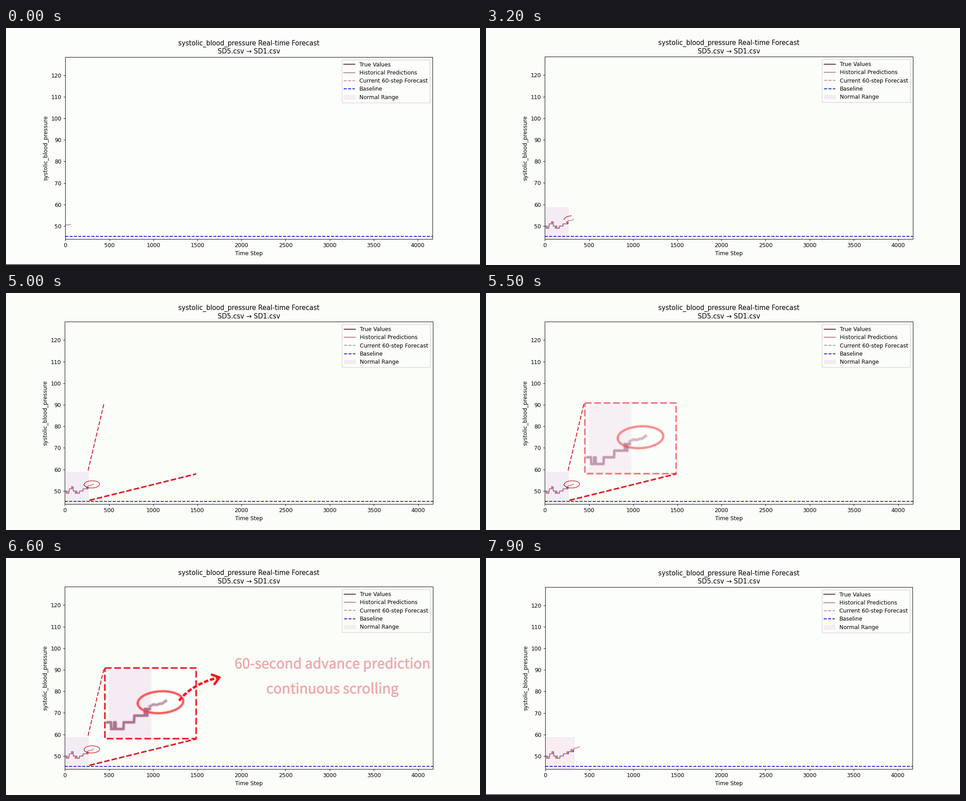
A matplotlib script for the animation above (8000 ms loop, 1057x530 px).

```python
import numpy as np
import matplotlib.pyplot as plt
from matplotlib.animation import FuncAnimation
from matplotlib.colors import to_rgb
from matplotlib.lines import Line2D
from matplotlib.patches import Rectangle
from matplotlib.patheffects import withStroke

W, H, DPI = 1057, 530, 64
PX = 72 / DPI          # points per pixel
S = 88 / DPI           # chart styling is sized for 88 dpi
FRAMES, INTERVAL = 80, 100
PAUSE, RESUME = 28, 73  # frames between which the chart stands still
RATE, HELD = 9.8, 264.6
X_MAX, BASE = 4170, 45.1
RED = "#ee1c22"
PAGE, PAGE_HELD = "#fcfefb", "#fbfdf9"

plt.rcParams.update({
    "font.family": "DejaVu Sans",
    "font.size": 10 * S,
    "lines.linewidth": 1.5 * S,
    "axes.linewidth": 0.8 * S,
    "patch.linewidth": 1.0 * S,
})


def step_series(knots, xs):
    starts, levels = np.array(knots).T
    return levels[np.searchsorted(starts, xs, side="right") - 1]


steps = np.arange(0, 401)
shared = [(0, 50), (15, 49), (22, 50), (27, 49), (46, 50), (50, 51), (76, 52),
          (81, 51), (84, 52), (94, 51), (97, 50), (119, 49), (130, 50),
          (136, 49), (166, 50), (206, 51)]
true_values = step_series(shared + [(262, 52), (318, 53)], steps)
predictions = step_series(
    shared + [(246, 52), (251, 51), (256, 52), (290, 53), (298, 52), (303, 53)],
    steps)


def forecast_at(now):
    """60 steps ahead: a small jump, a plateau, then a rise."""
    level = predictions[int(now)]
    rise = 0.4 + 0.2 * (level - 50)
    ahead = np.arange(61)
    shape = np.interp(ahead, [0, 14, 25, 36, 46, 60], [0, 0.35, 0.25, 0.45, 0.5, 1])
    return now + ahead, level + 0.4 + rise * shape


# Chart
fig = plt.figure(figsize=(W / DPI, H / DPI), dpi=DPI)
ax = fig.add_axes([0.125, 0.11, 0.775, 0.77])
ax.set(xlim=(0, X_MAX), ylim=(44, 128.55),
       xticks=range(0, 4001, 500), yticks=range(50, 121, 10))
ax.patch.set_visible(False)
ax.tick_params(length=3.5 * S, width=0.8 * S, pad=3.5 * S)
ax.set_xlabel("Time Step", labelpad=4 * S)
ax.set_ylabel("systolic_blood_pressure", labelpad=4 * S)
ax.set_title("systolic_blood_pressure Real-time Forecast\nSD5.csv → SD1.csv",
             pad=6 * S)

true_line, = ax.plot([], [], color="#552036", label="True Values")
pred_line, = ax.plot([], [], color="#bd7a8e", label="Historical Predictions")
next_line, = ax.plot([], [], color="#c48a99")
next_key = Line2D([], [], ls="--", color="#c08d96", label="Current 60-step Forecast")
base_line = ax.axhline(BASE, ls="--", label="Baseline")
normal = ax.add_patch(Rectangle((10, 0.7 * BASE), 0, 0.6 * BASE, fc="#f7edf3",
                                ec="#f3e7ef", zorder=0.5, label="Normal Range"))
legend = ax.legend(handles=[true_line, pred_line, next_key, base_line, normal],
                   loc="upper right", facecolor="none", labelspacing=0.43)

# Annotation layer, in pixels from the top left
top = fig.add_axes([0, 0, 1, 1])
top.set(xlim=(0, W), ylim=(H, 0))
top.axis("off")


def stroke(points, width, color, dash=None, **kw):
    xs, ys = np.array(points, float).T
    style = (0, tuple(d / width for d in dash)) if dash else "-"
    return top.plot(xs, ys, color=color, lw=width * PX, ls=style, snap=False, **kw)[0]


def ellipse(cx, cy, rx, ry, tilt):
    """Points running clockwise from the left end."""
    a = np.pi + np.linspace(0, 2 * np.pi, 121)
    c, s = np.cos(tilt), np.sin(tilt)
    x, y = rx * np.cos(a), ry * np.sin(a)
    return np.column_stack([cx + x * c - y * s, cy + x * s + y * c])


def segment(start, end, n=121):
    return np.linspace(start, end, n)


def bezier(a, b, c, n=121):
    t = np.linspace(0, 1, n)[:, None]
    return (1 - t) ** 2 * np.array(a) + 2 * t * (1 - t) * np.array(b) + t ** 2 * np.array(c)


def zoomed(xs, ys):
    """Data coordinates to pixels inside the magnified box."""
    px = 131.5 + np.asarray(xs) * 0.1969
    py = 442.5 - (np.asarray(ys) - 50) * 4.814
    return np.column_stack([344.5 + (px - 191.5) * 3, 322.5 + (py - 428) * 3.1])


def progress(ms, start, end):
    return min(max((ms - start) / (end - start), 0), 1)


def mix(a, b, t):
    return tuple((1 - t) * np.array(to_rgb(a)) + t * np.array(to_rgb(b)))


bottom_edge = stroke([(0, 529.4), (W, 529.4)], 1.3, "black")

# Strokes that grow along their path: (line, points, start ms, end ms)
growing = []


def grow(points, start, end, width, color, dash=None):
    growing.append((stroke(points, width, color, dash), points, start, end))


grow(ellipse(191.5, 428, 17.3, 8, -0.03), 3000, 3800, 1.3, "#d0101c")
upper = segment((183, 397), (218.5, 247))
lower = segment((186, 464), (424, 405))
grow(upper, 4000, 4800, 1.9, "#c8141c", (9, 4))
grow(lower + (0, -0.8), 4000, 4800, 2.4, "#8c1a20", (12, 5))
grow(lower, 4000, 4800, 2.8, RED, (12, 5))
grow(bezier((386, 319), (415, 282), (474, 267)), 6050, 6400, 5.6, RED, (10, 4))
arrow_head = stroke([(459, 261), (476, 267), (465, 282)], 5.4, RED,
                    solid_capstyle="round", solid_joinstyle="round")

# Magnified box: (artist, full opacity)
inset = []


def add_inset(artist, alpha=1.0):
    inset.append((artist, alpha))


def box(x0, y0, x1, y1, color):
    return top.add_patch(Rectangle((x0, y0), x1 - x0, y1 - y0, fc=color, lw=0))


def soft_stroke(points, width, color):
    for extra, alpha in ((4, 0.15), (2, 0.3), (0, 0.75)):
        add_inset(stroke(points, width + extra, color), alpha)


add_inset(box(220, 246, 424, 404, PAGE))
add_inset(box(227, 248, 326, 403, "#f9f4f7"))
add_inset(box(230, 249, 323, 403, "#f5ecf3"))
soft_stroke(zoomed(steps[104:265], predictions[104:265]), 4.6, "#a0607c")
soft_stroke(zoomed(*forecast_at(HELD)), 4.8, "#b58a9e")
soft_stroke(ellipse(344.5, 322.5, 50.8, 24.4, -0.06), 3.8, "#f4403e")
add_inset(stroke([(220.5, 246), (424, 246), (424, 404), (220.5, 404), (220.5, 246)],
                 3.5, RED, (15, 6)))

captions = [
    top.text(728, y, text, ha="center", va="baseline",
             family="Noto Sans CJK JP", size=31.1 * PX)
    for y, text in ((247, "60-second advance prediction"),
                    (303, "continuous scrolling"))
]


def place_axes(left, right, upper_y, lower_y):
    ax.set_position([left / W, 1 - lower_y / H, (right - left) / W,
                     (lower_y - upper_y) / H])


def draw_chart(frame, paused):
    if paused:
        now = HELD
        place_axes(131.2, 952.2, 64.2, 471.7)
    else:
        now = RATE * frame if frame < PAUSE else HELD + RATE * (frame - RESUME)
        place_axes(132.3, 951.3, 64.7, 471.7)
    fig.set_facecolor(PAGE_HELD if paused else PAGE)
    for line in (base_line, legend.legend_handles[3]):
        line.set_color("#1c1cc4" if paused else "#1a12e2")
    for patch in (normal, legend.legend_handles[4]):
        patch.set_facecolor("#f4ecf4" if paused else "#f7edf3")
    seen = int(now)
    true_line.set_data(steps[:seen], true_values[:seen])
    pred_line.set_data(steps[:seen], predictions[:seen])
    next_line.set_data(*forecast_at(now))
    normal.set_width(max(now - 10, 0))
    normal.set_visible(now > 10)
    bottom_edge.set_visible(not paused)


def draw_notes(ms, paused):
    for line, points, start, end in growing:
        shown = int(round(progress(ms, start, end) * len(points)))
        line.set_data(*points[:shown].T)
        line.set_visible(paused and shown > 1)
    arrow_head.set_visible(paused and ms >= 6400)
    fade = progress(ms, 5200, 5700)
    for artist, alpha in inset:
        artist.set_alpha(alpha * fade)
        artist.set_visible(paused and fade > 0)
    fade = progress(ms, 6400, 6900)
    ink = mix(PAGE_HELD, "#de343c", fade)
    for caption in captions:
        caption.set_color(ink)
        caption.set_path_effects([withStroke(linewidth=0.9 * PX, foreground=ink)])
        caption.set_visible(paused and fade > 0)


def update(frame):
    paused = PAUSE <= frame < RESUME
    draw_chart(frame, paused)
    draw_notes(frame * INTERVAL, paused)
    return []


anim = FuncAnimation(fig, update, frames=FRAMES, interval=INTERVAL,
                     init_func=lambda: update(0), repeat=True, repeat_delay=0)
plt.show()
```
